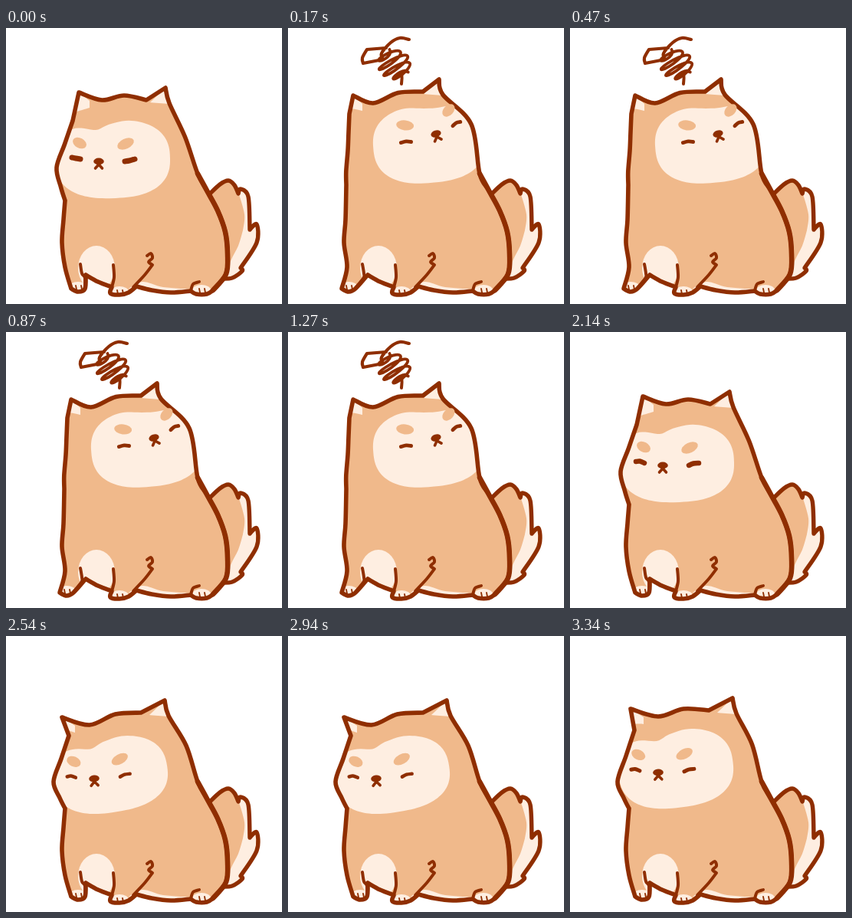
Recreate the animation shown at these times as an HTML page with a canvas. Size 360 by 360 pixels, loop 3540 ms.

```html
<!DOCTYPE html>
<html lang="en">
<head>
<meta charset="utf-8">
<title>Grumpy dog</title>
<style>
  html, body { margin: 0; width: 100%; height: 100%; overflow: hidden; background: #fff; }
  canvas { display: block; width: 100vw; height: 100vh; }
</style>
</head>
<body>
<canvas id="stage" width="360" height="360"></canvas>
<script>
const ctx = document.getElementById('stage').getContext('2d');
const LINE = '#8f2e00', FUR = '#f0b98b', CREAM = '#feeee1';
const LOOP = 3540, HOLD = 200;
let wobble = 0;

const add = ([x, y], dx, dy) => [x + dx, y + dy];
const mix = (a, b, t = 0.5) => [a[0] + (b[0] - a[0]) * t, a[1] + (b[1] - a[1]) * t];
const radians = degrees => degrees * Math.PI / 180;
const power = (v, p) => Math.sign(v) * Math.abs(v) ** p;

// Hand-drawn line boil: a small offset that depends only on the position.
const boil = ([x, y]) => add([x, y], wobble * Math.sin(x * 0.31 + y * 0.17), wobble * Math.cos(x * 0.13 - y * 0.29));

// Smooth curve through "x,y x,y"; "|" marks a sharp corner.
function curve(text, close) {
  const path = new Path2D();
  let last = null;
  for (const part of text.split('|')) {
    const pts = part.trim().split(/\s+/).map(p => boil(p.split(',').map(Number)));
    if (last) pts.unshift(last); else path.moveTo(...pts[0]);
    for (let i = 0; i < pts.length - 1; i++) {
      const b = pts[i], c = pts[i + 1], a = pts[i - 1] || b, d = pts[i + 2] || c;
      path.bezierCurveTo(b[0] + (c[0] - a[0]) / 6, b[1] + (c[1] - a[1]) / 6,
        c[0] - (d[0] - b[0]) / 6, c[1] - (d[1] - b[1]) / 6, ...c);
    }
    last = pts[pts.length - 1];
  }
  if (close) path.closePath();
  return path;
}
function fill(text, color) {
  ctx.fillStyle = color;
  ctx.fill(curve(text, true));
}
function stroke(text, width = 4) {
  ctx.lineWidth = width;
  ctx.strokeStyle = LINE;
  ctx.stroke(curve(text));
}
function oval(center, rx, ry, color, degrees = 0) {
  ctx.fillStyle = color;
  ctx.beginPath();
  ctx.ellipse(...boil(center), rx, ry, radians(degrees), 0, 7);
  ctx.fill();
}
function fillInside(outline, paint) {
  const path = curve(outline, true);
  ctx.save();
  ctx.fillStyle = FUR;
  ctx.fill(path);
  ctx.clip(path);
  paint();
  ctx.restore();
}

const NECK = [250, 190];
const BACK = '262,212 276,238 286,266 289,295 287,321 270,342';
const TAIL = '264,218 279,204 290,199 298,205 303,216 | 306,210 316,220 318,263 | 327,256 327,280 306,313 | 308,317 295,326 278,327';

function drawTail() {
  fillInside(TAIL, () => fill('303,214 311,243 309,264 | 303,284 293,304 284,330 | 335,330 335,205', CREAM));
  stroke(TAIL, 5.4);
}

// Ears, crown and cheeks follow from the two ear tips and a few landmarks.
function headOutline({ tipL, tipR, ear, temple, cheek, neck, bulge }) {
  const innerL = add(tipL, ear + 2, 10), innerR = add(tipR, 3 - ear, 16), outerR = add(tipR, 5, 20);
  const crown = add(mix(innerL, innerR), 0, -6), nape = add(mix(outerR, NECK), bulge, -bulge);
  return [neck, add(mix(cheek, neck, 0.6), -1, 0), cheek, mix(temple, cheek), temple, '|', tipL, '|',
    innerL, crown, innerR, '|', tipR, '|', outerR, nape, NECK].join(' ');
}
const bodyOutline = foot => `${BACK} | 262,347 248,347 241,343 | 215,345 190,342 170,337 |
  160,345 148,348 136,346 138,338 | 120,331 104,322 | ${103 + foot},340 ${94 + foot},344 ${85 + foot},340 |
  77,312 73,280 75,250`;

// A tilted, squarish oval with a notch between the brows.
function drawMask({ center, rx, ry, tilt, notch, depth }) {
  ctx.save();
  ctx.translate(...center);
  ctx.rotate(radians(tilt));
  ctx.beginPath();
  for (let a = -Math.PI; a < Math.PI; a += 0.05) {
    const r = 1 - depth * Math.exp(-(((a - notch) / 0.27) ** 2));
    ctx.lineTo(r * rx * power(Math.cos(a), 0.8), r * ry * power(Math.sin(a), 0.8));
  }
  ctx.fillStyle = CREAM;
  ctx.fill();
  ctx.restore();
}
function drawFeatures({ nose, tilt = 0, mirror = 1, eyeWidth = 5, eyeBend = 2 }) {
  ctx.save();
  ctx.translate(...nose);
  ctx.rotate(radians(tilt));
  ctx.scale(mirror, 1);
  oval([-25, -24], 9.5, 6.5, FUR, 28);
  oval([35, -23], 11.5, 6.5, FUR, -25);
  stroke(`-35,-5 -30,${-4 - eyeBend} -24,-3`, eyeWidth);
  stroke(`34,0 40,${-1 - eyeBend} 47,-3`, eyeWidth);
  oval([0, 0], 6.8, 4.4, LINE);
  stroke('-4.5,9 0,4 | 4.5,9', 3.6);
  ctx.restore();
}
function drawSmear(pose) {
  ctx.save();
  ctx.filter = 'blur(1px)';
  ctx.globalAlpha = 0.28;
  for (let t = -1; t <= 1; t += 0.15) drawFeatures({ ...pose, nose: add(pose.nose, 20 * t, -8 * t) });
  ctx.restore();
  stroke('137,175 146,165 | 157,178', 4);
}

function drawDog(pose) {
  const { tipL, tipR, temple, ear, foot = 0 } = pose;
  const outline = headOutline(pose) + ' ' + bodyOutline(foot) + ' ' + pose.neck;
  const paws = [[94 + foot, 338], [148, 344], [255, 342]];
  drawTail();
  fillInside(outline, () => {
    oval([118, 313], 24, 29, CREAM);
    fill('160,340 178,331 205,338 243,342 200,350', CREAM);
    paws.forEach(paw => oval(paw, 12, 7, CREAM));
    drawMask(pose.mask);
    fill([tipL, mix(tipL, temple, 0.7), add(tipL, ear * 0.5, 20), add(tipL, ear * 0.5, 11)].join(' | '), CREAM);
    fill([tipR, add(tipR, -20, 19), add(tipR, 3, 21)].join(' | '), CREAM);
  });
  for (const [x, y] of paws)
    for (const dx of [-3, 4]) stroke(`${x + dx},${y - 2} ${x + dx + 1},${y + 3}`, 1.8);
  stroke('184,297 189,294 191,300 186,305 191,309 | 181,322 166,338');
  stroke('140,309 141,325 138,338');
  stroke(`97,308 99,320 ${103 + foot * 0.3},326 ${103 + foot},339`);
  stroke('241,343 244,334 252,331');
  stroke(outline, 5.6);
  stroke(NECK + ' ' + BACK, 6.6);
  if (pose.smear) drawSmear(pose); else drawFeatures(pose);
  if (pose.scribble) drawScribble();
}

// A slanted coil running down to a stem, with a loose box and a flying end.
function drawScribble() {
  const coil = [];
  for (let t = 0; t <= 1; t += 0.03) {
    const a = t * Math.PI * 8, reach = 8 + 14 * Math.sin(t * Math.PI);
    coil.push([126 + 25 * t + 0.8 * reach * Math.cos(a) + 2 * Math.sin(a), 32 + 31 * t - 0.5 * reach * Math.cos(a) + 4 * Math.sin(a)]);
  }
  stroke(coil.join(' '), 3.8);
  stroke('158,15 146,13 134,19 122,33 124,41 | 98,46 | 97,39 103,28 | 128,26', 4.2);
  stroke('139,64 148,60 148,73', 4);
}

const rest = {
  tipL: [95, 84], tipR: [208, 78], ear: 28, temple: [87, 121], cheek: [66, 182], neck: [77, 225], bulge: 2,
  nose: [121, 174], eyeWidth: 7, eyeBend: 0,
  mask: { center: [139, 171], rx: 75, ry: 51, tilt: -2, notch: -1.82, depth: 0.22 }
};
const blink = { ...rest, eyeWidth: 6.5, eyeBend: 1.5 };
const dip = {
  ...rest, tipL: [79, 95], tipR: [212, 81], ear: 34, temple: [84, 123], cheek: [62, 190], bulge: 4,
  nose: [115, 178], tilt: -2, eyeWidth: 5, eyeBend: 1.5,
  mask: { ...rest.mask, center: [138, 173], tilt: -7 }
};
const low = {
  ...dip, tipL: [73, 106], tipR: [207, 84], temple: [82, 130], nose: [115, 186], tilt: -4, eyeWidth: 4.5,
  mask: { ...rest.mask, center: [136, 181], ry: 49, tilt: -9 }
};
const smear = {
  ...rest, smear: true, tipL: [93, 84], tipR: [199, 71], ear: 23, temple: [87, 114], bulge: 14, foot: -7,
  nose: [158, 160], tilt: -10, eyeWidth: 7,
  mask: { ...rest.mask, center: [160, 168], rx: 110, ry: 55, tilt: -5, depth: 0.05 }
};
const up = {
  ...rest, scribble: true, phase: 100, tipL: [85, 88], tipR: [197, 67], ear: 24, temple: [80, 112],
  cheek: [78, 160], neck: [76, 205], bulge: 13, foot: -15,
  nose: [193, 138], tilt: -18, mirror: -1, eyeWidth: 4.8, eyeBend: 1.5,
  mask: { center: [184, 151], rx: 73, ry: 51, tilt: -5, notch: -1.5, depth: 0.1 }
};

const timeline = [
  [0, rest], [100, smear], [170, up], [1570, smear], [1640, rest],
  [1740, blink], [2340, dip], [2540, low], [3340, dip]
];

function frame() {
  const time = performance.now() % LOOP;
  const [start, pose] = timeline.findLast(([from]) => from <= time);
  // Every second drawing of a held pose boils.
  wobble = Math.floor((time - start + (pose.phase || 0)) / HOLD) % 2 * 0.8;
  ctx.fillStyle = '#fff';
  ctx.fillRect(0, 0, 360, 360);
  ctx.lineCap = ctx.lineJoin = 'round';
  drawDog(pose);
  requestAnimationFrame(frame);
}
frame();
</script>
</body>
</html>
```
